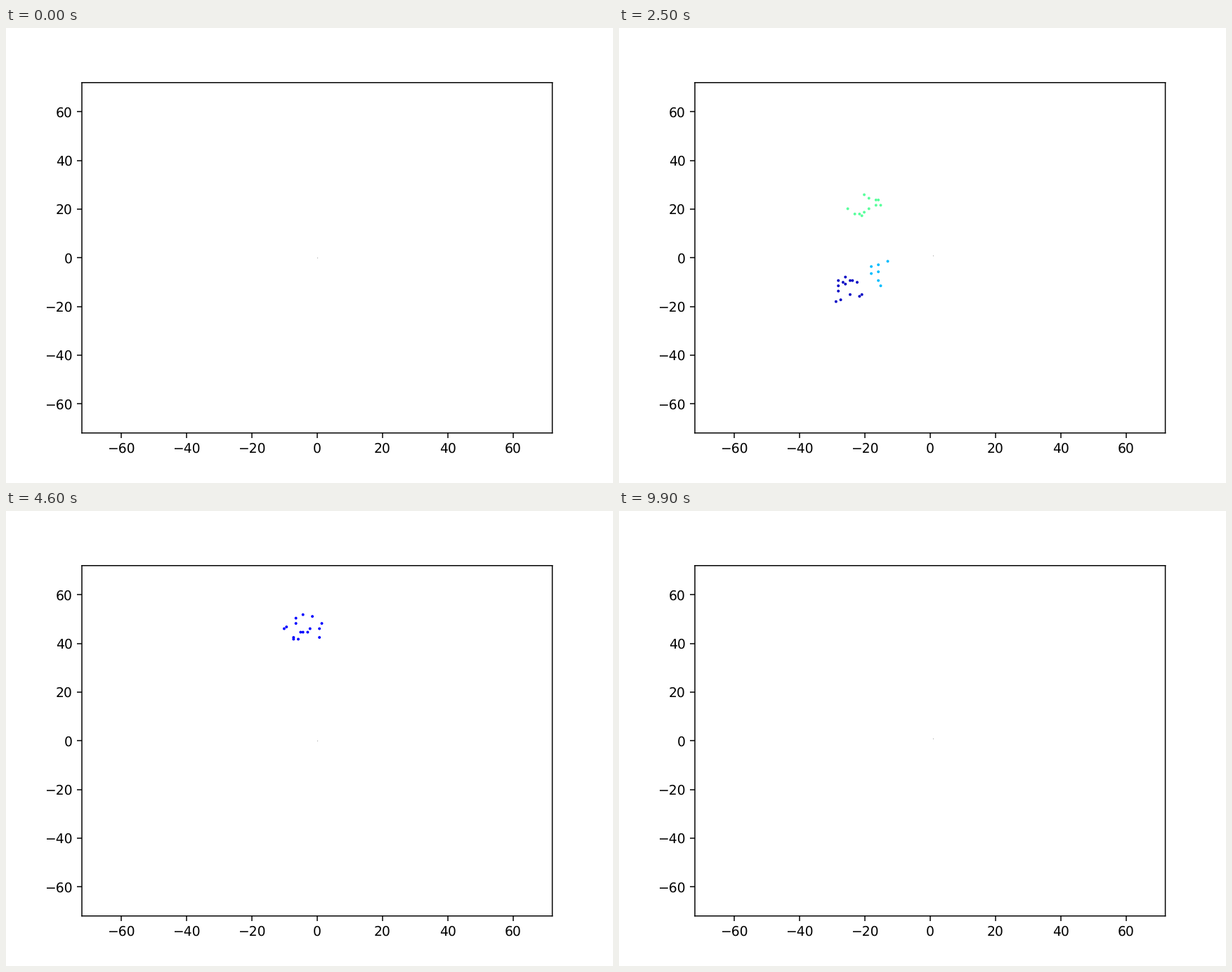
These frames come from a looping animation (864 by 648 pixels, 10000 ms). A matplotlib script:

```python
import matplotlib.pyplot as plt
import numpy as np
from matplotlib.animation import FuncAnimation

FRAMES, INTERVAL = 100, 100
LIMIT = 72
CELL = LIMIT / 100   # detections sit on a regular grid
RADIUS = 6.3         # extent of one object
MEAN_HITS = 11

# jet position, first and last step, start point, end point
OBJECTS = [
    (0.135, 2, 21, (36, 1), (37, -1)),
    (0.36, 4, 21, (61, -4), (61.5, -15.5)),
    (0.31, 8, 44, (-18.5, -17), (-13, 6.5)),
    (0.46, 9, 34, (-20, 0), (-19, 33)),
    (0.06, 12, 42, (-31, -5), (-18, -22)),
    (0.11, 29, 47, (8, 31), (-5, 47)),
    (0.41, 30, 44, (-35.5, -44.5), (-38.5, -53)),
    (0.26, 50, 66, (-3, 24), (3.5, 22.5)),
    (0.85, 52, 72, (32.5, -46), (44.5, -47.5)),
]

plt.rcParams.update({"path.snap": False, "text.hinting": "none"})


def scatter_hits(rng, centre):
    """Random detections in a disc, snapped to the grid."""
    n = max(7, rng.poisson(MEAN_HITS))
    r = RADIUS * np.sqrt(rng.random(n))
    a = rng.uniform(0, 2 * np.pi, n)
    cloud = np.column_stack((r * np.cos(a), r * np.sin(a)))
    cloud += centre - cloud.mean(axis=0)
    return np.round(cloud / CELL) * CELL


fig, ax = plt.subplots(figsize=(6.4, 4.8), dpi=135)
ax.set_xlim(-LIMIT, LIMIT)
ax.set_ylim(-LIMIT, LIMIT)
dots = ax.scatter([], [], s=4.4, linewidths=0)
sensor = ax.scatter([0], [0], s=0.5, c="#b0b0b0", linewidths=0)


def update(step):
    rng = np.random.default_rng(step)
    points, colors = [], []
    for shade, first, last, start, end in OBJECTS:
        if first <= step <= last:
            u = (step - first) / (last - first)
            centre = (1 - u) * np.array(start) + u * np.array(end)
            hits = scatter_hits(rng, centre)
            points.extend(hits)
            colors.extend([plt.cm.jet(shade)] * len(hits))
    dots.set_offsets(np.reshape(points, (-1, 2)))
    dots.set_facecolor(colors)
    sensor.set_offsets([[step % 2, step % 2]])
    return dots, sensor


anim = FuncAnimation(fig, update, frames=FRAMES, interval=INTERVAL,
                     repeat=True, repeat_delay=0)
plt.show()
```
